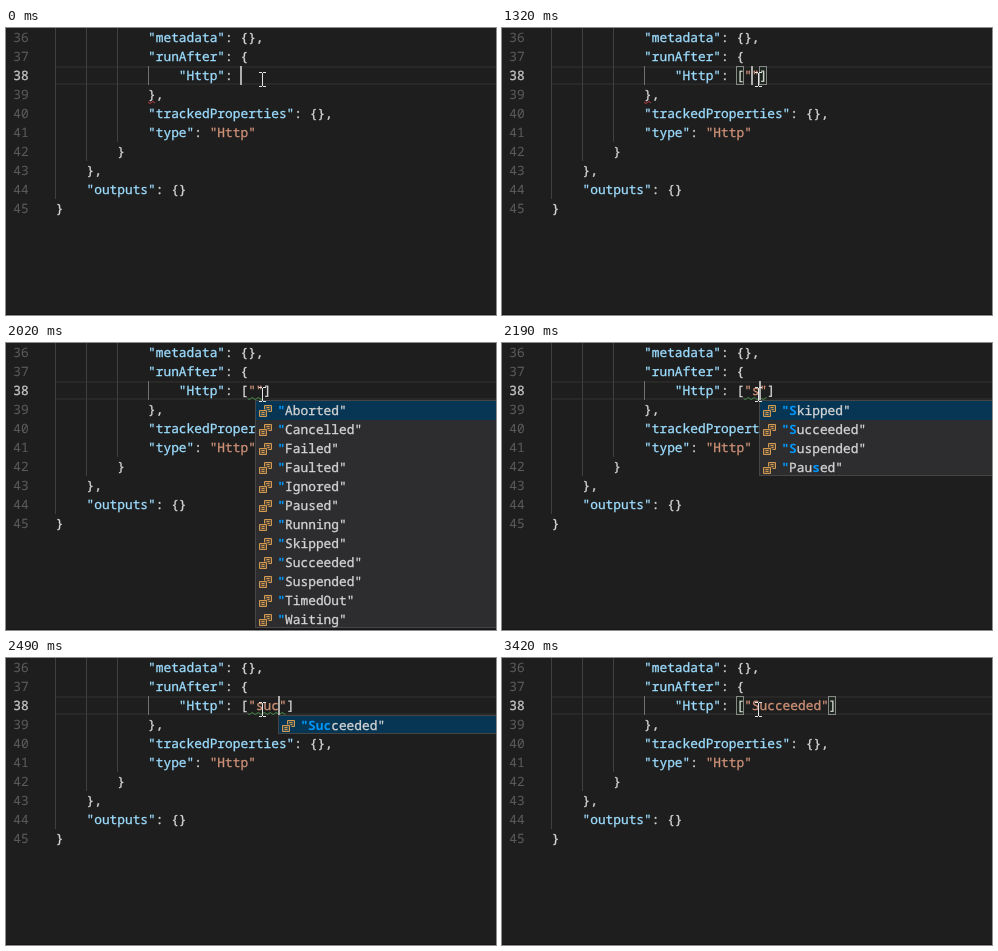
Recreate the animation shown at these times as an HTML page. Size 490 px wide and 287 px high, loop 3590 ms.

```html
<!DOCTYPE html>
<html lang="en">
<head>
<meta charset="utf-8">
<title>Code completion</title>
<style>
  html, body { margin: 0; width: 100%; height: 100%; overflow: hidden; background: #1e1e1e; }
  svg { display: block; width: 490px; height: 287px; }
  text {
    font: 12.83px "Noto Sans Mono", "DejaVu Sans Mono", monospace;
    text-rendering: geometricPrecision;
    white-space: pre;
    fill: currentColor;
    stroke: currentColor;
    stroke-width: .3px;
  }
  rect { shape-rendering: crispEdges; }
  .key { color: #9cdcfe; }
  .str { color: #ce9178; }
  .pun { color: #d4d4d4; }
  .num { color: #5a5a5a; stroke-width: .1px; }
  .num.on { color: #c6c6c6; stroke-width: .3px; }
  .hit { color: #0097fb; font-weight: bold; stroke: none; }
  .wave { fill: none; stroke-width: 1; }
</style>
</head>
<body>
<svg id="stage" viewBox="0 0 490 287">
  <rect width="490" height="287" fill="#1e1e1e"/>
  <rect y="286" width="490" height="1" fill="#191217"/>
  <g id="page"></g>
  <g id="live"></g>
  <path d="M253 44.5h3m1 0h3M256.5 45v13M253 58.5h3m1 0h3" fill="none" stroke="#e4e4e4"/>
</svg>
<script>
const CHAR = 7.698, ROW = 19, LEFT = 49.7, FIRST = 36, EDIT = 2, EDIT_COL = 24;
const LOOP = 3590;
const page = document.getElementById('page');
const live = document.getElementById('live');

const lines = [
  [12, '"metadata": {},'],
  [12, '"runAfter": {'],
  [16, '"Http": '],
  [12, '},'],
  [12, '"trackedProperties": {},'],
  [12, '"type": "Http"'],
  [8, '}'],
  [4, '},'],
  [4, '"outputs": {}'],
  [0, '}']
];

const statuses = ['Aborted', 'Cancelled', 'Failed', 'Faulted', 'Ignored', 'Paused',
  'Running', 'Skipped', 'Succeeded', 'Suspended', 'TimedOut', 'Waiting'];
const suList = ['Succeeded', 'Suspended', 'Paused'];
const done = '["Succeeded"]';

// at: start in ms, text: what is typed, caret: its column, wave: length of the warning line
const states = [
  { at: 0, text: '', caret: 0, error: true },
  { at: 230, text: '', error: true },
  { at: 710, text: '[]', caret: 1, error: true },
  { at: 780, text: '[]', caret: 1, match: true, error: true },
  { at: 1240, text: '[]', match: true, error: true },
  { at: 1320, text: '[""]', caret: 2, match: true, error: true },
  { at: 1410, text: '[""]', caret: 2, error: true, list: statuses, query: '', listCol: 2 },
  { at: 1870, text: '[""]', error: true, list: statuses, query: '', listCol: 2 },
  { at: 2020, text: '[""]', wave: 2, list: statuses, query: '', listCol: 2 },
  { at: 2190, text: '["s"]', caret: 3, wave: 3, list: ['Skipped', ...suList], query: 's', listCol: 3 },
  { at: 2260, text: '["su"]', caret: 4, wave: 4, list: suList, query: 'su', listCol: 4 },
  { at: 2430, text: '["suc"]', caret: 5, wave: 5, list: suList, query: 'su', listCol: 5 },
  { at: 2490, text: '["suc"]', caret: 5, wave: 5, list: ['Succeeded'], query: 'suc', listCol: 5 },
  { at: 2570, text: done, caret: 12, wave: 5 },
  { at: 2660, text: done, caret: 12, match: true, wave: 5 },
  { at: 3040, text: done, match: true, wave: 5 },
  { at: 3420, text: done, match: true }
];

const colX = col => LEFT + col * CHAR;
const rect = (x, y, w, h, fill) =>
  `<rect x="${Math.floor(x)}" y="${y}" width="${w}" height="${h}" fill="${fill}"/>`;
const label = (x, y, cls, s) => `<text x="${x.toFixed(2)}" y="${y}" class="${cls}">${s}</text>`;

function code(row, col, src) {
  let out = '';
  for (const m of src.matchAll(/"[^"]*"|[^\s"]+/g)) {
    const s = m[0];
    const cls = s[0] !== '"' ? 'pun' : src[m.index + s.length] === ':' ? 'key' : 'str';
    out += label(colX(col + m.index), row * ROW + 14, cls, s);
  }
  return out;
}

function wave(x, y, width, color) {
  let d = '';
  for (let i = 0; i <= width; i += 0.5) {
    const rise = Math.abs((i + 1.25) % 6 - 3) * 2 / 3;
    d += `${d ? 'L' : 'M'}${x + i} ${(y + 2.5 - rise).toFixed(2)}`;
  }
  return `<path class="wave" d="${d}" stroke="${color}"/>`;
}

function bracketBox(col) {
  const x = Math.floor(colX(col)) + 0.5;
  return `<rect x="${x}" y="38.5" width="7" height="18" fill="#006400" fill-opacity=".1" stroke="#888"/>`;
}

function icon(x, y) {
  return `<g transform="translate(${x} ${y})" fill="#d19a50" fill-opacity=".25" stroke="#d19a50">
    <path d="M5.5 4.5v-4h7v6h-3M7.5 2.5h3M8.5 4.5h2"/>
    <path d="M.5 5.5h7v6h-7zM2.5 7.5h3M2.5 9.5h3"/></g>`;
}

function option(word, x, y, query) {
  const hits = [...query].map(c => word.toLowerCase().indexOf(c) + 1);
  return [...`"${word}"`].map((c, i) =>
    label(x + i * CHAR, y, i === 0 || hits.includes(i) ? 'hit' : 'pun', c)).join('');
}

function popup({ list, query, listCol }) {
  const x = Math.floor(colX(EDIT_COL + listCol)), top = 57, h = list.length * ROW;
  let out = rect(x, top, 490 - x, h, '#454545') +
    rect(x + 1, top + 1, 490 - x, h - 2, '#2d2d30') +
    rect(x + 1, top + 1, 490 - x, Math.min(ROW, h - 2), '#073655');
  list.forEach((word, i) => {
    const y = top + 1 + i * ROW;
    out += icon(x + 4, y + 4) + option(word, x + 22.4, y + 14, query);
  });
  return out;
}

function drawPage() {
  let out = rect(LEFT, 38, 441, 2, '#282828') + rect(LEFT, 55, 441, 2, '#282828');
  lines.forEach(([indent, src], row) => {
    for (let col = 0; col < indent; col += 4)
      out += rect(colX(col), row * ROW, 1, ROW, col === 12 ? '#707070' : '#404040');
    out += label(7.3, row * ROW + 14, row === EDIT ? 'num on' : 'num', FIRST + row);
    out += code(row, indent, src);
  });
  page.innerHTML = out;
}

function drawState(s) {
  let out = '';
  if (s.match) out += bracketBox(EDIT_COL) + bracketBox(EDIT_COL + s.text.length - 1);
  out += code(EDIT, EDIT_COL, s.text);
  if (s.error) out += wave(142, 73, 7, '#e04545');
  if (s.wave) out += wave(241.5, 54, s.wave * CHAR, '#4d9e4d');
  if (s.caret !== undefined) out += rect(colX(EDIT_COL + s.caret), 38, 2, ROW, '#aeafad');
  if (s.list) out += popup(s);
  live.innerHTML = out;
}

let shown;
const start = performance.now();
function tick() {
  const t = (performance.now() - start) % LOOP;
  const now = states.findLast(s => s.at <= t);
  if (now !== shown) drawState(shown = now);
  requestAnimationFrame(tick);
}
drawPage();
tick();
</script>
</body>
</html>
```
